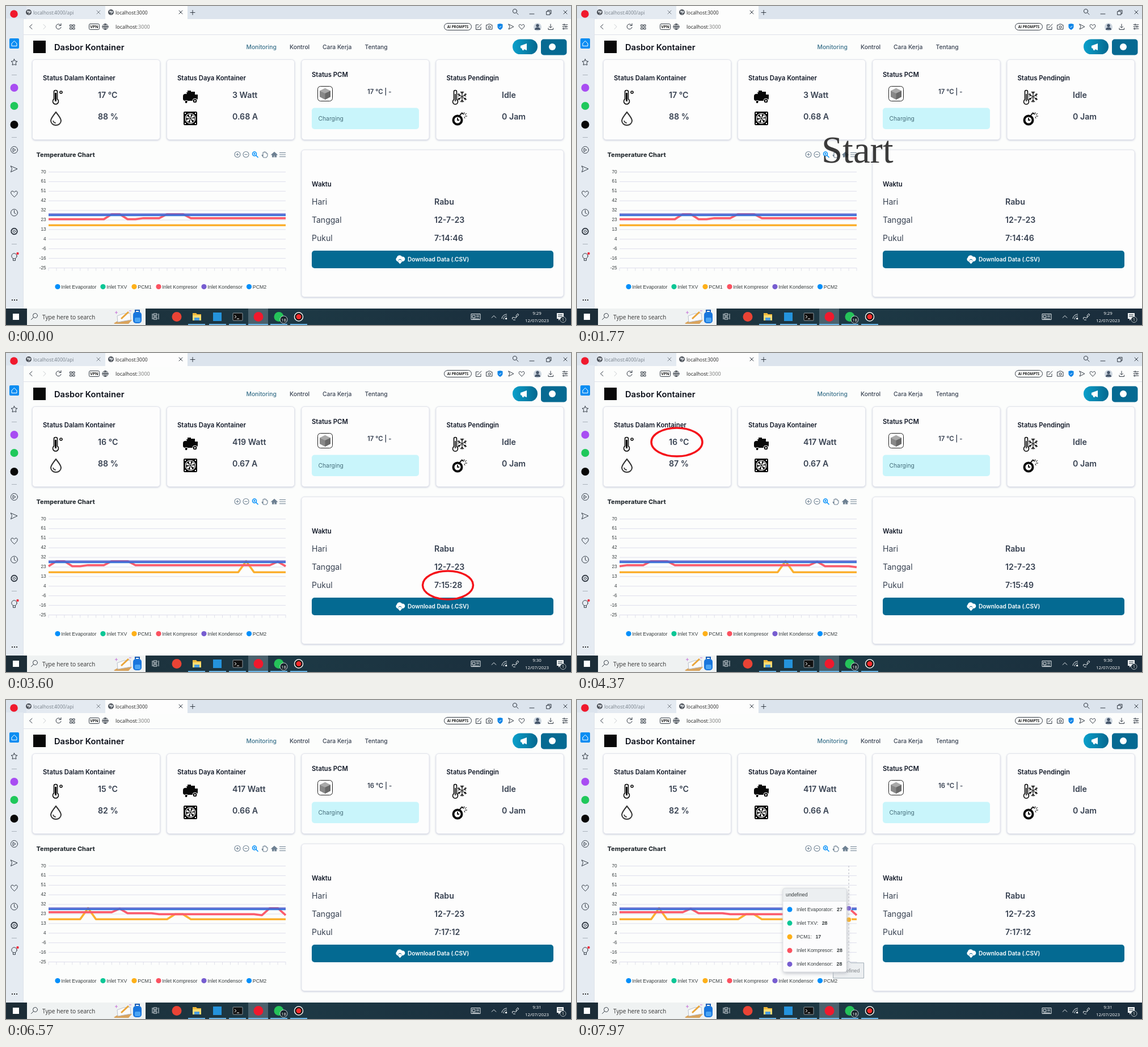
These frames come from a looping animation (996x562 px, 8 s). An HTML page:

```html
<!DOCTYPE html>
<html lang="id">
<head>
<meta charset="utf-8">
<title>Dasbor Kontainer</title>
<style>
html, body { margin: 0; width: 100%; height: 100%; overflow: hidden; background: #fcfdfc; }
svg { display: block; width: 100vw; height: 100vh; }
text { font-family: Inter, sans-serif; fill: #374151; white-space: pre; }
.ui { font-family: "Open Sans", sans-serif; font-size: 8.4px; fill: #222; }
.chart { font-family: "Liberation Sans", sans-serif; font-size: 8.8px; fill: #373d3f; }
.head { font-size: 11.3px; font-weight: 600; fill: #111827; }
.val { font-size: 14.2px; font-weight: 600; }
.label { font-size: 14px; }
.nav { font-size: 10.3px; font-weight: 500; }
.line { fill: none; stroke: #333b45; stroke-width: 1; stroke-linecap: round; stroke-linejoin: round; }
.card { fill: #fdfdfd; stroke: #e3e5ec; filter: drop-shadow(0 1.5px 1.5px #c9cddc); }
.series { fill: none; stroke-width: 3.6; stroke-linejoin: round; }
</style>
</head>
<body>
<svg id="stage" viewBox="0 0 996 562">
<defs>
  <linearGradient id="pill"><stop stop-color="#0aa0cb"/><stop offset="1" stop-color="#05688f"/></linearGradient>
  <linearGradient id="bar"><stop stop-color="#1c2c36"/><stop offset=".5" stop-color="#1d3945"/><stop offset="1" stop-color="#1a2c3b"/></linearGradient>
  <g id="globe"><circle r="5" fill="#4b5058"/><path d="M-3-2Q-1-4 0-2T-2 1ZM1-3L4-1 2 2 0 1ZM-1 3L1 2 1 4Z" fill="#d5d9dd"/></g>
  <path id="close" class="line" d="M-3-3L3 3M3-3L-3 3"/>
</defs>

<!-- browser -->
<rect width="996" height="23" fill="#dce4ed"/>
<rect y="22" width="30" height="511" fill="#e5ebf2"/>
<rect x="36" width="139" height="23" fill="#e4eaf1"/>
<rect x="175" width="145" height="24" fill="#fdfdfd"/>
<path d="M30 50.5H996M30.5 23V533" stroke="#dfe2ea"/>
<use href="#globe" x="40" y="11"/><use href="#globe" x="185" y="11"/>
<text class="ui" x="48" y="14.5" style="fill:#77808a">localhost:4000/api</text>
<text class="ui" x="193" y="14.5">localhost:3000</text>
<use href="#close" x="163" y="11" opacity=".6"/><use href="#close" x="308" y="11"/><use href="#close" x="986" y="11"/>
<path class="line" d="M325 11.500H333M329 7.500V15.500M923 14H931M953 9.500H959V15.500H953ZM955 9V7.500H961V13.500H959M900 12L903 15M46 32.500L41.500 36.500 46 40.500M96.500 34A4.500 4.500 0 1 0 97 37.500M97 31V34.500H93.500"/>
<circle class="line" cx="897" cy="9" r="3.600"/>
<path class="line" d="M66 32.500L70 36.500 66 40.500" opacity=".25"/>
<path class="line" d="M113 33H116V36H113ZM118 33H121V36H118ZM113 38H116V41H113ZM118 38H121V41H118Z"/>
<rect class="line" x="146.500" y="31.500" width="18" height="10" rx="2"/>
<text class="ui" x="155.500" y="39.200" text-anchor="middle" style="font-size:7px;font-weight:700">VPN</text>
<path class="line" d="M170 36.500H180M175 31.500V41.500M175 31.500Q169.500 36.500 175 41.500M175 31.500Q180.500 36.500 175 41.500"/><circle class="line" cx="175" cy="36.500" r="5"/>
<text class="ui" x="193" y="40" style="font-size:9px">localhost<tspan fill="#777">:3000</tspan></text>
<rect class="line" x="772.500" y="30.500" width="48" height="12" rx="6"/>
<text class="ui" x="796.500" y="39" text-anchor="middle" style="font-size:6.200px;font-weight:700">AI PROMPTS</text>
<path class="line" d="M833 33H828.500V41.500H837V37M831 39L838 32M847 33.500H849L850 32H854L855 33.500H857V41H847ZM886 32L895 36.500 886 41 888 36.500ZM909 41L904.500 36.500Q903.500 32 907 32.500L909 34.500 911 32.500Q914.500 32 913.500 36.500ZM960 32V38M957.500 36L960 38.500 962.500 36M956 39V41.500H964.500V39M981 33H990M981 36.500H990M981 40H990M984 31.500V34.500M987 35V38M983 38.500V41.500"/>
<circle class="line" cx="852" cy="37" r="2"/>
<path d="M866.500 32L871 31 875.500 32V37Q875 40 871 42 867 40 866.500 37Z" fill="#0a84e8"/><path d="M869 36.500L870.500 38 873 35" stroke="#fff" fill="none"/>
<circle cx="937" cy="37" r="7" fill="#cdd6df"/><circle cx="937" cy="34.500" r="2.700" fill="#46566a"/><path d="M932 42Q932 37.500 937 37.500T942 42Z" fill="#46566a"/>

<!-- sidebar -->
<circle cx="14" cy="14" r="6.800" fill="#f0192d"/>
<rect x="6" y="57" width="17" height="18" rx="2" fill="#0a8df2"/>
<path d="M10 66L14.500 61.500 19 66V70.500H10Z" fill="none" stroke="#fff"/>
<path class="line" d="M14.500 93.500L16 97 20 97.500 17 100 18 104 14.500 103 11 104 12 100 9 97.500 13 97ZM12.500 251L17 253.500 12.500 256.500ZM8.500 282L20 287 8.500 292.500 10.500 287ZM14.500 336.500L9.500 331.500Q7 326 12 326L14.500 328 17 326Q22 326 19.500 331.500ZM14.500 360V364.500L17 366M12.500 445V448.500H16.500V445"/>
<g class="line"><circle cx="14.500" cy="253.500" r="6"/><circle cx="14.500" cy="364" r="6"/><circle cx="14.500" cy="397" r="5.200" stroke-dasharray="2.600 1.500" stroke-width="2"/><circle cx="14.500" cy="397" r="2"/><circle cx="14.500" cy="440.500" r="4.700"/></g>
<circle cx="20.500" cy="436" r="2.200" fill="#f02c3c"/>
<path d="M10 121.500H19M10 231.500H19M10 419.500H19" stroke="#aab2bb"/>
<circle cx="14.500" cy="144" r="7" fill="#a84df2"/><circle cx="14.500" cy="176" r="7" fill="#1fc85b"/><circle cx="14.500" cy="209" r="7" fill="#080808"/>
<path d="M10 518H20" stroke="#333" stroke-width="2" stroke-dasharray="2 2"/>

<!-- page header -->
<rect x="48" y="61" width="22" height="22" fill="#080808"/>
<text x="85" y="77.500" style="font-size:14.700px;font-weight:600;fill:#0b0f19">Dasbor Kontainer</text>
<text class="nav" x="423.500" y="76" style="fill:#38708a">Monitoring</text><text class="nav" x="500" y="76">Kontrol</text><text class="nav" x="558" y="76">Cara Kerja</text><text class="nav" x="632.500" y="76">Tentang</text>
<rect x="893" y="58.500" width="44" height="26.500" rx="13.200" fill="url(#pill)"/>
<path d="M907 70L918 66V78L907 74ZM909 74H912L913 78H910.500Z" fill="#fff"/>
<rect x="943" y="58.500" width="45.500" height="28" rx="5" fill="#066a92"/><circle cx="963" cy="72" r="6" fill="#fff"/>

<!-- cards -->
<g id="cards"></g>
<text class="head" x="65" y="131">Status Dalam Kontainer</text><text class="head" x="302" y="131">Status Daya Kontainer</text><text class="head" x="539" y="125">Status PCM</text><text class="head" x="776.500" y="131">Status Pendingin</text>
<text class="val" id="temp" x="162" y="162"></text><text class="val" id="hum" x="162" y="200"></text>
<text class="val" id="watt" x="399" y="162"></text><text class="val" id="amp" x="399" y="200"></text>
<text id="pcm" x="637" y="154.500" style="font-size:11.300px;font-weight:600"></text>
<text class="val" x="874" y="162">Idle</text><text class="val" x="874" y="200">0 Jam</text>
<rect x="539" y="179.500" width="189" height="37.500" rx="5" fill="#c9f5fb"/>
<text x="550.500" y="202" style="font-size:10.300px;fill:#466f7c">Charging</text>
<g fill="none" stroke="#0a0a0a" stroke-width="1.600">
  <path d="M84.500 164V151Q84.500 148.500 87.500 148.500T90.500 151V164A5 5 0 1 1 84.500 164Z"/><circle cx="97" cy="152" r="2"/>
  <path d="M87.500 153V168" stroke-width="3"/>
  <path d="M88 187Q79 198 79 202A9 8 0 0 0 97 202Q97 198 88 187Z" stroke="#333" stroke-width="2"/><path d="M83 202Q84 206 88 206" stroke="#333"/>
  <path d="M789.500 165V151Q789.500 148.500 792 148.500T794.500 151V165A4.500 4.500 0 1 1 789.500 165ZM792 155V168"/>
  <path d="M804 150V170M796 155L812 165M796 165L812 155M801 151L804 154 807 151M801 169L804 166 807 169M797 159L800 157.500 798 154M811 159L808 157.500 810 154M797 162L800 163 798 166M811 162L808 163 810 166" stroke-width="1.200"/>
  <circle cx="796" cy="201" r="7.500" stroke-width="4"/><path d="M796 197V201H799M800 193L802 190Q805 188 807 191" stroke-width="1.800"/>
  <path d="M807 187L809 190M812 189L809 192M813 194H809M809 198L808 195M803 187L805 189" stroke-width="1"/>
</g>
<path d="M319 155Q312 154 312 159V164Q312 167 317 167H333Q338 167 338 162V156H333V151H326V149H320V152H318ZM316 166H320L319 171H316Z" fill="#080808"/><circle cx="333" cy="167" r="4" fill="#080808" stroke="#fdfdfd"/><path d="M332 165L335 167 332 169Z" fill="#fff"/>
<rect x="313" y="186" width="24" height="24" rx="2" fill="#080808"/>
<g fill="none" stroke="#fff"><circle cx="325" cy="198" r="8.700" stroke-width="1.200"/><circle cx="325" cy="198" r="5" stroke-width="4.500" stroke-dasharray="3 2.200"/><circle cx="325" cy="198" r="2"/><path d="M315 189H317M333 189H335M315 207H317M333 207H335" stroke-width="2"/></g>
<rect x="549.500" y="141.500" width="26" height="26" rx="5" fill="#fdfdfd" stroke="#222"/>
<path d="M562.500 145L572 149.500V160L562.500 165 553 160V149.500Z" fill="#888"/><path d="M562.500 145L572 149.500 562.500 154 553 149.500Z" fill="#aaa"/><path d="M562.500 154L572 149.500V160L562.500 165Z" fill="#696969"/>

<!-- time card -->
<text class="head" x="539" y="318">Waktu</text>
<text class="label" x="539" y="350">Hari</text><text class="label" x="539" y="382">Tanggal</text><text class="label" x="539" y="414">Pukul</text>
<text class="val" x="755" y="350">Rabu</text><text class="val" x="755" y="382">12-7-23</text><text class="val" id="clock" x="755" y="414"></text>
<rect x="539" y="431" width="426" height="31" rx="5" fill="#046a92"/>
<path d="M690 450A4 4 0 0 1 689 443 5 5 0 0 1 698 441.500 4 4 0 0 1 700 450H696.500V446H692.500V450ZM693 447H696V450H698.500L694.500 454.500 690.500 450H693Z" fill="#fff"/>
<text x="708" y="450" style="font-size:10.100px;font-weight:600;fill:#fff">Download Data (.CSV)</text>

<!-- chart -->
<text x="53.500" y="266" style="font-size:11px;font-weight:800;fill:#2c3338">Temperature Chart</text>
<g fill="none" stroke="#6e8192" stroke-width="1.100"><circle cx="408" cy="261.500" r="5"/><circle cx="423" cy="261.500" r="5"/><path d="M405.500 261.500H410.500M408 259V264M420.500 261.500H425.500M482 258.500H493M482 262H493M482 265.500H493"/>
  <path d="M451 262L453 264V258H455V257H457V258H459V260H461V264L459 267H454L451 263"/><path d="M468 262L473 257.500 478 262H476.500V266H474V263H472V266H469.500V262Z" fill="#6e8192"/></g>
<g fill="none" stroke="#008ffb" stroke-width="1.500"><circle cx="438" cy="260.500" r="3.500"/><path d="M440.500 263L444.500 267M436.500 260.500H439.500M438 259V262"/></g>
<g id="axes"></g>
<path class="series" id="yellow" stroke="#fbb030"/>
<path class="series" id="pink" stroke="#fb5b6c"/>
<path class="series" d="M75 368.500H493" stroke="#2673dc" opacity=".92"/>
<path class="series" d="M75 367H493" stroke="#5a63cf" opacity=".75"/>
<g id="legend"></g>
<g id="hover">
  <path id="crosshair" d="M0 292V461" stroke="#b6b6c2" stroke-dasharray="3"/>
  <g id="markers" stroke="#fff" stroke-width="1.200"><circle cy="367" r="4.700" fill="#775dd0"/><circle cy="387" r="4.700" fill="#feb019"/></g>
  <g id="axisTip"><path d="M-27.500 463H-3.500L0 459.500 3.500 463H26.500V490H-27.500Z" fill="#eceff1" stroke="#9eabb5"/><text class="chart" y="479.500" text-anchor="middle" style="fill:#808488">undefined</text></g>
  <g id="tip"></g>
</g>

<!-- taskbar -->
<rect y="533" width="996" height="29" fill="url(#bar)"/>
<rect x="12" y="542" width="11" height="11" fill="#fff"/>
<rect x="37" y="533" width="209" height="29" fill="#eff2f2"/>
<circle class="line" cx="51.500" cy="545.500" r="4"/><path class="line" d="M48.500 548.500L44.500 552.500"/>
<text class="ui" x="64" y="551.500" style="font-size:10.200px;fill:#333">Type here to search</text>
<path d="M190 559L200 553H222L216 560H192Z" fill="#d9a35c"/><path d="M196 546L207 542 219 541 220 553 208 555 197 557Z" fill="#fafafa" stroke="#b9c1cc"/><path d="M203 551L216 539" stroke="#e9a53a" stroke-width="3"/><path d="M192 540H197M194.500 537.500V542.500M217 537H221" stroke="#c777d8"/>
<rect x="224" y="539" width="15" height="20" rx="5" fill="#1976dd"/><path d="M228 539V536H235V539" fill="none" stroke="#155bb5" stroke-width="2"/><rect x="227" y="549" width="10" height="8" rx="2" fill="#4ba5f4"/>
<path d="M258 542V552M260 542H266V545H260ZM260 549H266V552H260ZM269 542V552M260 547H266" stroke="#dde4e8" fill="none"/>
<rect x="427" y="533" width="35" height="29" fill="#4b626d"/>
<circle cx="301" cy="547.500" r="8.500" fill="#ea4335"/>
<path d="M329 541H335L337 543H344V554H329Z" fill="#f2b93b"/><path d="M329 545H344V554H329Z" fill="#ffdc73"/><path d="M332 554V549H341V554" fill="#4c9ede"/>
<rect x="365" y="540" width="15" height="15" fill="#2493dc"/>
<rect x="400" y="541" width="17" height="13" rx="1" fill="#111" stroke="#929a9f"/><path d="M403 545L406 547.500 403 550M407 551H411" stroke="#fff" fill="none"/>
<circle cx="445" cy="547.500" r="8.500" fill="#f0192d"/>
<circle cx="481" cy="547.500" r="8.500" fill="#25c35a"/><circle cx="489.500" cy="552.500" r="6.500" fill="#17232b" stroke="#e9edef" stroke-width=".8"/><text class="ui" x="489.500" y="555.500" text-anchor="middle" style="font-size:7.800px;fill:#fff">18</text>
<circle cx="516" cy="547.500" r="7.500" fill="#111" stroke="#f2f2f2" stroke-width="1.500"/><circle cx="516" cy="547.500" r="4.500" fill="#f52c2c"/>
<path d="M321 561H351M358 561H388M393 561H423M427 561H462M466 561H496M501 561H531" stroke="#6bb6e8" stroke-width="2"/>
<g fill="none" stroke="#e5eaed"><path d="M820 542.500H836V552.500H820ZM822 545H827V549H822ZM829 545H834M829 547.500H834M822 551H834M856 549.500L860 545.500 864 549.500M893 552Q891 547 896 549T899 546L902 542 904 544 899 549M894 553H898"/><path d="M874 551A9 9 0 0 1 883 543M877 552A6 6 0 0 1 883 546M880 552A3 3 0 0 1 883 549"/></g>
<circle cx="882" cy="551" r="1.300" fill="#fff"/>
<text class="ui" id="sysTime" x="936" y="543.500" text-anchor="middle" style="font-size:7.900px;fill:#fff"></text><text class="ui" x="936" y="556.500" text-anchor="middle" style="font-size:7.900px;fill:#fff">12/07/2023</text>
<path d="M971 541H983V551H977L974 554V551H971Z" fill="#f4f6f7"/><path d="M973 544H981M973 547H981" stroke="#1b2c38"/><circle cx="982" cy="552.500" r="5" fill="#1b2c38" stroke="#ccd3d7" stroke-width=".8"/><text class="ui" x="982" y="555.300" text-anchor="middle" style="font-size:7.500px;fill:#fff">1</text>

<!-- annotations -->
<g fill="none" stroke="#f5121a" stroke-width="3.500"><ellipse id="clockRing" cx="779" cy="409" rx="44.500" ry="25"/><ellipse id="tempRing" cx="176" cy="157" rx="45" ry="25"/></g>
<text id="start" x="431" y="275.500" style="font:67px 'Liberation Serif',serif;fill:#1c1c1c">Start</text>
</svg>
<script>
const $ = id => document.getElementById(id);
const LEFT = 75, STEP = 418 / 30;
const SERIES = [
  ['Inlet Evaporator', '#008ffb', 91], ['Inlet TXV', '#0bc796', 171], ['PCM1', '#feb019', 226],
  ['Inlet Kompresor', '#fb5260', 269], ['Inlet Kondensor', '#775dd0', 349], ['PCM2', '#008ffb', 428.5],
];
const valueY = v => 292 + (70 - v) * 169 / 95;
const clamp = v => Math.max(0, Math.min(1, v));
const ramp = (t, from, to) => clamp((t - from) / (to - from));
const mix = (a, b, p) => a + (b - a) * p;
const show = (id, on) => $(id).setAttribute('visibility', on ? 'visible' : 'hidden');
const move = (id, x, y = 0) => $(id).setAttribute('transform', `translate(${x} ${y})`);
const put = (id, s) => { if ($(id).textContent !== s) $(id).textContent = s; };

// Temperature readings: [first index, value], each held until the next entry.
const KOMPRESOR = [[0, 23], [8, 28], [10, 23], [12, 24], [15, 28], [18, 24], [36, 27.5], [37, 23], [41, 22], [54, 21], [55, 28], [57, 21]];
const PCM1 = [[0, 17], [32, 28], [33, 17], [43, 22], [45, 17], [58, 16]];
const reading = (list, i) => list.findLast(([first]) => first <= i)[1];
const trace = (list, first) => 'M' + Array.from({ length: 31 }, (_, i) =>
  `${LEFT + i * STEP} ${valueY(reading(list, first + i))}`).join('L');

const card = (x, y, w, h) => `<rect class="card" x="${x}" y="${y}" width="${w}" height="${h}" rx="5"/>`;
$('cards').innerHTML = [46.5, 283.5, 521, 758].map(x => card(x, 94.5, 225, 141)).join('') + card(521, 253.5, 462, 259);

$('axes').innerHTML = [70, 61, 51, 42, 32, 23, 13, 4, -6, -16, -25].map((v, i) => {
  const y = 292.5 + i * 16.9;
  return `<path d="M${LEFT} ${y}H493" stroke="#dedeec"/><text class="chart" x="70.5" y="${y + 2}" text-anchor="end" style="font-size:8.2px">${v}</text>`;
}).join('') + Array.from({ length: 31 }, (_, i) => `<path d="M${LEFT + i * STEP} 461.5v5" stroke="#dfdfea"/>`).join('');

$('legend').innerHTML = SERIES.map(([name, color, x]) =>
  `<circle cx="${x}" cy="494.5" r="4.6" fill="${color}"/><text class="chart" x="${x + 6.3}" y="497.5">${name}</text>`).join('');

$('tip').innerHTML = `<rect width="112" height="147" rx="3" fill="#fff" fill-opacity=".96" stroke="#e0e2e5" style="filter:drop-shadow(1px 2px 3px #b9bcc4)"/>
  <path d="M0 22.500V3Q0 0 3 0H109Q112 0 112 3V22.500Z" fill="#eceff1" stroke="#dde1e4"/><text class="chart" x="5" y="14">undefined</text>` +
  SERIES.slice(0, 5).map(([name, color], i) => `<circle cx="12" cy="${37 + i * 24.1}" r="4.5" fill="${color}"/>
  <text class="chart" x="24" y="${40 + i * 24.1}">${name}:<tspan dx="6.5" font-weight="700" id="tip${i}"></tspan></text>`).join('');

// Number of new samples received; playback is sped up in the middle.
function sampleCount(t) {
  if (t < 2400) return 0;
  if (t < 2720) return 1;
  if (t < 4400) return Math.min(11, 2 + Math.floor((t - 2720) / 175));
  return Math.min(27, 12 + Math.floor((t - 4400) / 110));
}

function clockText(k) {
  const s = k < 1 ? 46 : k < 11 ? 56 + 5.3 * (k - 1) : k < 24 ? 109 + 69 / 13 * (k - 11) : 178 + 14 / 3 * (k - 24);
  const sec = Math.round(s);
  return `7:${14 + Math.floor(sec / 60)}:${String(sec % 60).padStart(2, '0')}`;
}

function drawHover(t) {
  const on = t >= 7120, last = t < 7400, x = LEFT + STEP * (last ? 30 : 29);
  show('hover', on);
  if (!on) return;
  move('crosshair', x);
  move('markers', x);
  move('axisTip', x);
  $('markers').setAttribute('opacity', last ? 0 : 1);
  const slide = ramp(t, 7200, 7400), settle = ramp(t, 7400, 7650);
  move('tip', mix(mix(192.5, 377, slide), 363, settle), mix(mix(291, 318, slide), 332, settle));
  $('tip').setAttribute('opacity', mix(.6, 1, ramp(t, 7200, 7380)));
  [27, 28, 17, last ? 21 : 28, 28].forEach((v, i) => put('tip' + i, String(v)));
}

function draw(t) {
  const k = sampleCount(t);
  put('temp', `${k < 7 ? 17 : k < 18 ? 16 : 15} °C`);
  put('hum', `${k < 1 ? 88 : Math.round(k < 11 ? mix(90, 87, (k - 1) / 10) : mix(87, 82, clamp((k - 11) / 13)))} %`);
  put('watt', `${k < 1 ? 3 : Math.round(mix(422, 417, clamp((k - 1) / 10)))} Watt`);
  put('amp', `${k < 1 ? '0.68' : k < 18 ? '0.67' : '0.66'} A`);
  put('pcm', `${reading(PCM1, 31 + k)} °C | -`);
  put('clock', clockText(k));
  put('sysTime', t < 3290 ? '9:29' : t < 4850 ? '9:30' : '9:31');
  $('pink').setAttribute('d', trace(KOMPRESOR, k));
  $('yellow').setAttribute('d', trace(PCM1, k));
  $('start').setAttribute('opacity', Math.min(ramp(t, 350, 1130), 1 - ramp(t, 1700, 2200)));
  show('clockRing', t >= 2400 && t < 3750);
  show('tempRing', t >= 4000 && t < 6250);
  drawHover(t);
}

(function frame() {
  draw(performance.now() % 8000);
  requestAnimationFrame(frame);
})();
</script>
</body>
</html>
```
